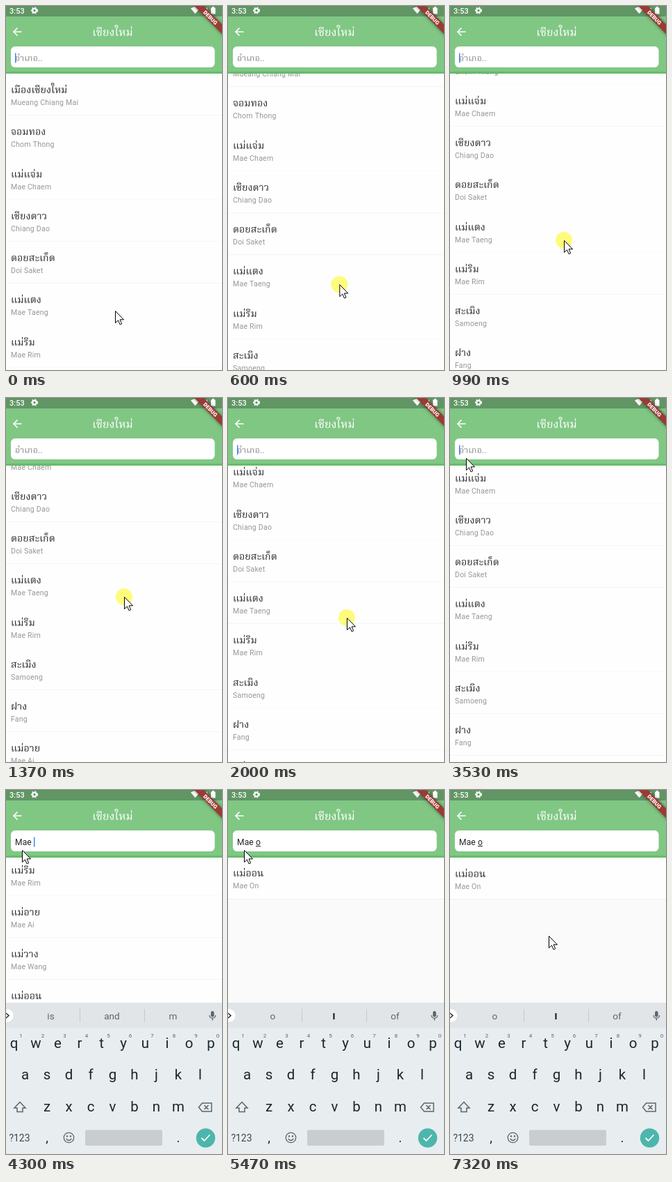
Animation of 311x522 px, one loop 7400 ms. Source, as an HTML page with a canvas:

```html
<!DOCTYPE html>
<html lang="th">
<head>
<meta charset="utf-8">
<title>District search</title>
<style>
html, body { margin: 0; width: 100%; height: 100%; overflow: hidden; background: #fafafa; }
canvas { display: block; }
</style>
</head>
<body>
<canvas id="stage" width="311" height="522"></canvas>
<script>
const ctx = document.getElementById('stage').getContext('2d');
const LOOP = 7400, W = 311, H = 522;
const LIST_TOP = 97, ROW = 60.25, KEYBOARD_TOP = 305;
const FONT = 'Roboto, "Noto Sans Thai Looped", "Noto Serif Thai", "Noto Sans Thai", "Noto Sans", sans-serif';

const districts = [
  ['เมืองเชียงใหม่', 'Mueang Chiang Mai'], ['จอมทอง', 'Chom Thong'], ['แม่แจ่ม', 'Mae Chaem'],
  ['เชียงดาว', 'Chiang Dao'], ['ดอยสะเก็ด', 'Doi Saket'], ['แม่แตง', 'Mae Taeng'],
  ['แม่ริม', 'Mae Rim'], ['สะเมิง', 'Samoeng'], ['ฝาง', 'Fang'], ['แม่อาย', 'Mae Ai'],
  ['พร้าว', 'Phrao'], ['แม่วาง', 'Mae Wang'], ['แม่ออน', 'Mae On'],
];

// time, field text, start of the underlined part, suggestions
const typing = [
  [3530, '', 0, ['', '', '']],
  [3840, 'M', 0, ['m', 'M', 'Me']],
  [4070, 'Mae', 0, ['may', 'Mae', 'Mar']],
  [4300, 'Mae ', 4, ['is', 'and', 'm']],
  [4850, 'Mae o', 4, ['o', 'I', 'of']],
];
const pointerPath = [
  [0, 157, 437], [350, 158, 440], [990, 164, 336], [1370, 170, 285], [1690, 170, 285],
  [2000, 171, 315], [2100, 171, 324], [2380, 70, 107], [2700, 30, 89], [3000, 23, 86],
  [6200, 23, 86], [6320, 12, 87], [6500, 12, 87], [6860, 136, 216], [7200, 136, 216], [7320, 142, 209],
];
const scrollPath = [[0, 0], [350, 0], [990, 104.5], [1370, 160], [1690, 160], [2000, 134.3], [2100, 126]];

function along(path, t) {
  const next = path.findIndex(p => p[0] > t);
  if (next < 0) return path[path.length - 1].slice(1);
  const a = path[next - 1], b = path[next], k = (t - a[0]) / (b[0] - a[0]);
  return a.slice(1).map((v, i) => v + (b[i + 1] - v) * k);
}

function scrollAt(t) {
  const s = (t - 4850) / 1000;
  if (s <= 0) return along(scrollPath, t)[0];
  const slow = 9.07, fast = 22.03; // overdamped spring back to the top
  return 126 * (fast * Math.exp(-slow * s) - slow * Math.exp(-fast * s)) / (fast - slow);
}

function rect(x, y, w, h, color, radius = 0) {
  ctx.fillStyle = color;
  ctx.beginPath();
  ctx.roundRect(x, y, w, h, radius);
  ctx.fill();
}

function disc(x, y, r, color) {
  ctx.fillStyle = color;
  ctx.beginPath();
  ctx.arc(x, y, r, 0, 7);
  ctx.fill();
}

function text(str, x, y, size, color, { align = 'left', weight = 400, spacing = 0 } = {}) {
  ctx.font = `${weight} ${size}px ${FONT}`;
  ctx.letterSpacing = spacing + 'px';
  ctx.textAlign = align;
  ctx.fillStyle = color;
  ctx.fillText(str, x, y);
  return ctx.measureText(str).width;
}

function icon(x, y, path, { fill, stroke, width = 1.3 } = {}) {
  const shape = new Path2D(path);
  ctx.save();
  ctx.translate(x, y);
  if (fill) { ctx.fillStyle = fill; ctx.fill(shape); }
  if (stroke) { ctx.strokeStyle = stroke; ctx.lineWidth = width; ctx.stroke(shape); }
  ctx.restore();
}

function drawList(filter, scroll) {
  rect(0, LIST_TOP, W, H - LIST_TOP, '#fafafa');
  ctx.save();
  ctx.beginPath();
  ctx.rect(0, LIST_TOP, W, H - LIST_TOP);
  ctx.clip();
  districts.filter(d => d[1].toLowerCase().startsWith(filter.toLowerCase())).forEach(([thai, latin], i) => {
    const y = 96.5 + i * ROW - scroll;
    rect(0, y, W, ROW, '#fefefe');
    rect(0, Math.round(y + 59.9), W, 1, '#f0f0f0');
    text(thai, 7, y + 28.5, 14.2, '#2c2c2c');
    text(latin, 7, y + 45.5, 10.6, '#979797', { spacing: .19 });
  });
  ctx.restore();
}

function drawHeader(entry, caretOn) {
  rect(0, 0, W, LIST_TOP, '#81c784');
  rect(0, 94, W, 3, '#66bb6a');
  rect(0, 0, W, 15, '#619664');
  text('3:53', 5, 10.5, 11, '#fff', { weight: 500 });

  ctx.setLineDash([2.1, 1.83]);
  icon(41, 6.5, 'M4.2 0A4.2 4.2 0 1 1 -4.2 0A4.2 4.2 0 1 1 4.2 0', { stroke: '#fff', width: 1.6 });
  ctx.setLineDash([]);
  icon(41, 6.5, 'M2.7 0A2.7 2.7 0 1 1 -2.7 0A2.7 2.7 0 1 1 2.7 0', { stroke: '#fff', width: 2 });
  icon(272.5, 11, 'M0 0L-6.5 -7.5Q0 -12.5 6.5 -7.5Z', { fill: '#fff' });
  icon(281, 11, 'M0 0H9V-9Z', { fill: '#fff' });
  icon(295, 1, 'M0 1.5H2V0H4.5V1.5H6.5V10.5H0Z', { fill: '#fff' });

  icon(16.5, 37, 'M6 0H-5M0 -5.5L-5.5 0L0 5.5', { stroke: '#fff', width: 1.6 });
  text('เชียงใหม่', 153.5, 43, 16, '#fff', { align: 'center', weight: 500 });

  rect(7, 58, 293.5, 30, '#fff', 6);
  const [, value, underlineFrom] = entry;
  const style = { spacing: .11 };
  let end = 13;
  if (value) {
    end += text(value, 13, 78.5, 12.1, '#222', style);
    const start = 13 + ctx.measureText(value.slice(0, underlineFrom)).width;
    if (underlineFrom < value.length) rect(start, 80, end - start, 1, '#222');
  } else {
    text('อำเภอ..', 13, 78.5, 12.3, '#858585', style);
  }
  if (caretOn) rect(end, 67.5, 1.5, 14, '#4285f4');

  ctx.save();
  ctx.translate(W, 0);
  ctx.rotate(Math.PI / 4);
  ctx.shadowColor = 'rgba(0,0,0,.5)';
  ctx.shadowBlur = 5;
  rect(-45, 18.8, 90, 9.4, '#9a3b34');
  ctx.shadowBlur = 0;
  text('DEBUG', 0, 26.4, 7.8, '#fff', { align: 'center', weight: 900 });
  ctx.restore();
}

function drawKeyboard(suggestions) {
  const ink = '#1c272c', gray = '#5c666b', center = { align: 'center' };
  rect(0, KEYBOARD_TOP, W, H, '#e8edf0');
  rect(0, KEYBOARD_TOP, W, 36, '#e1e5e8');
  disc(1, 323.5, 9.5, '#fff');
  icon(2, 323.5, 'M-2 -3.5L2 0L-2 3.5', { stroke: '#333', width: 1.6 });
  rect(106, 314, 1, 19, '#c3c8cb');
  rect(199, 314, 1, 19, '#c3c8cb');
  suggestions.forEach((word, i) => {
    const bold = word === 'I';
    text(word, 64.5 + i * 88, 328.5, 13.6, bold ? '#111' : gray, { align: 'center', weight: bold ? 700 : 400 });
  });
  rect(295, 317, 4.6, 8.5, gray, 2.3);
  icon(297.3, 323, 'M-4.3 0A4.3 4.3 0 0 0 4.3 0M0 4.5V7.5', { stroke: gray });

  const keyRow = (keys, x, y) => [...keys].forEach((key, i) => text(key, x + i * 31.5, y, 20.5, ink, center));
  keyRow('qwertyuiop', 11.5, 370);
  keyRow('asdfghjkl', 27.5, 415);
  keyRow('zxcvbnm', 59, 461);
  [...'1234567890'].forEach((digit, i) => text(digit, 21.5 + i * 31.5, 355, 8, gray, center));

  icon(20, 455, 'M0 -7.5L8 1H4V6.5H-4V1H-8Z', { stroke: gray, width: 1.5 });
  icon(287, 455, 'M-9.5 0L-4.5 -6H9V6H-4.5ZM-1.5 -3L4.5 3M4.5 -3L-1.5 3', { stroke: gray, width: 1.5 });

  text('?123', 19.5, 503.5, 14, '#3f494e', center);
  text(',', 59, 505, 19, ink, center);
  text('.', 248, 505, 19, ink, center);
  icon(90.5, 498.5, 'M7.2 0A7.2 7.2 0 1 1 -7.2 0A7.2 7.2 0 1 1 7.2 0M-3.8 1.5Q0 6.5 3.8 1.5', { stroke: gray });
  disc(88, 496.5, 1.2, gray);
  disc(93, 496.5, 1.2, gray);
  rect(114, 487.5, 111, 22.5, '#c9cdd0', 2);
  disc(287.5, 499, 13.7, '#4db6ac');
  icon(287.5, 499, 'M-6 0L-2 4L6 -4.5', { stroke: '#fff', width: 1.8 });
}

function drawPointer(t) {
  const [x, y] = along(pointerPath, t);
  if (t > 300 && t < 2100) disc(x, y, 12, 'rgba(255,250,80,.75)');
  icon(x + .5, y + .5, 'M0 0V17L4 13.3L6.6 19.3L9.2 18.2L6.6 12.3H12Z', { fill: '#fff', stroke: '#000', width: 1 });
}

function draw(t) {
  const entry = typing.filter(e => e[0] <= t).pop() || typing[0];
  const caretOn = t < 3530 ? (t + 350) % 1000 < 500 : (t - entry[0]) % 985 < 500;
  drawList(entry[1], scrollAt(t));
  drawHeader(entry, caretOn);

  const rise = Math.min(1, Math.max(0, (t - 3590) / 200));
  if (rise > 0) {
    ctx.save();
    ctx.translate(0, (H - KEYBOARD_TOP) * (1 - rise) ** 2);
    drawKeyboard(entry[3]);
    ctx.restore();
  }
  drawPointer(t);
}

const start = performance.now();
function frame() {
  draw((performance.now() - start) % LOOP);
  requestAnimationFrame(frame);
}
frame();
</script>
</body>
</html>
```
